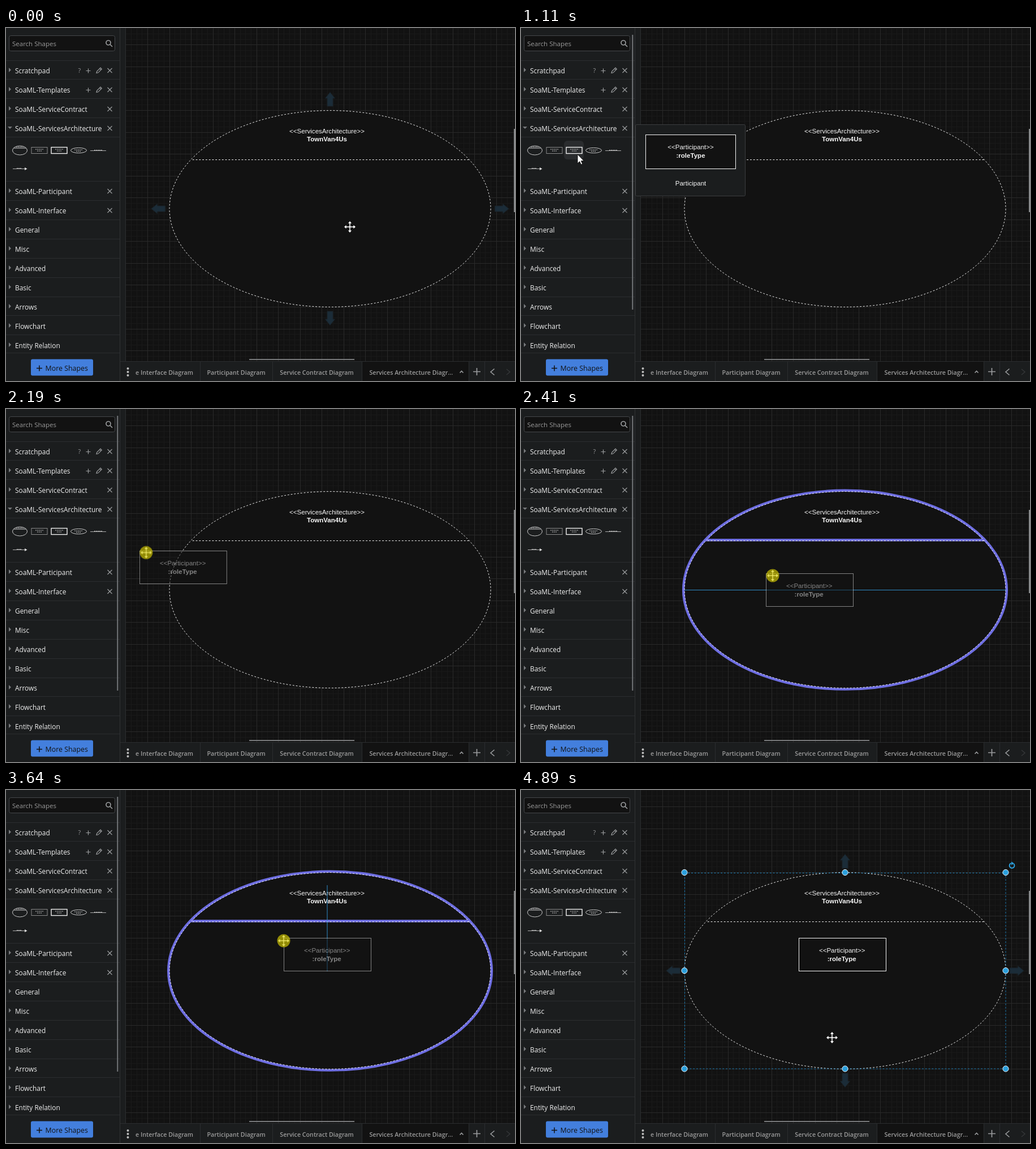
These frames come from a looping animation (900x623 px, 5740 ms). An HTML page:

```html
<!DOCTYPE html>
<html lang="en">
<head>
<meta charset="utf-8">
<title>Diagram editor</title>
<style>
html, body { margin: 0; width: 100%; height: 100%; overflow: hidden; background: #121212; }
svg { display: block; width: 100%; height: 100%; }
text { font-family: "Open Sans", "Noto Sans", sans-serif; fill: #f0f0f0; }
.row { font-size: 11.9px; }
.tab { font-size: 10.7px; font-weight: 600; fill: #9c9c9c; }
.label text { font: 11.56px "Liberation Sans", Arial, sans-serif; fill: #f6f6f6; text-anchor: middle; }
.label .b { font-weight: bold; }
.line { fill: none; stroke: #9a9c9e; }
.sep { fill: none; stroke: #2b2d2f; }
.dash { fill: none; stroke: #f4f4f4; stroke-dasharray: 2.891; }
.pick { fill: none; stroke: #1a7db5; stroke-dasharray: 2.891; }
.glow { fill: none; stroke: #6e6ee2; stroke-width: 4.4; }
.guide { fill: none; stroke: #2f8cc8; }

/* parts that switch on and off */
.k { opacity: 0; animation: 5740ms step-end infinite; }
.arrows { animation-name: arrows; }
.hover { animation-name: hover; }
.tip { animation-name: tip; }
.target { animation-name: target; }
.ghost { animation-name: ghost; }
.gh { animation-name: gh; }
.gv { animation-name: gv; }
.child { animation-name: child; }
.childSel { animation-name: childSel; }
.rootSel { animation-name: rootSel; }
.dot { animation-name: dot; }
.move { animation-name: move; }
.point { animation-name: point; }
.bar { animation-name: bar; }
@keyframes arrows { 0% { opacity: 1 } 6.87% { opacity: 0 } 71.5% { opacity: 1 } 79.61% { opacity: 0 } 83.8% { opacity: 1 } }
@keyframes hover { 13.58% { opacity: 1 } 34.49% { opacity: 0 } }
@keyframes tip { 19.33% { opacity: 1 } 33.27% { opacity: 0 } }
@keyframes target { 39.48% { opacity: 1 } 67.42% { opacity: 0 } }
@keyframes ghost { 36.98% { opacity: 1 } 67.42% { opacity: 0 } }
@keyframes gh { 41.98% { opacity: 1 } 56.68% { opacity: 0 } }
@keyframes gv { 47.21% { opacity: 1 } 67.42% { opacity: 0 } }
@keyframes child { 67.42% { opacity: 1 } 100% { opacity: 1 } }
@keyframes childSel { 67.42% { opacity: 1 } 81% { opacity: 0 } }
@keyframes rootSel { 81% { opacity: 1 } 100% { opacity: 1 } }
@keyframes dot { 33.27% { opacity: 1 } 67.42% { opacity: 0 } 79.61% { opacity: 1 } 82.4% { opacity: 0 } }
@keyframes move { 0% { opacity: 1 } 6.87% { opacity: 0 } 36.98% { opacity: 1 } 100% { opacity: 1 } }
@keyframes point { 6.87% { opacity: 1 } 36.98% { opacity: 0 } }
@keyframes bar {
  9.14% { opacity: 1 }
  79.61% { opacity: 1; animation-timing-function: steps(4, jump-both) }
  85.19%, 100% { opacity: 0 }
}

.cursor { animation: path 5740ms infinite; }
@keyframes path {
  0% { transform: translate(608px, 351px) }
  1.21% { transform: translate(608px, 351px); animation-timing-function: steps(8, jump-both) }
  10.27% { transform: translate(134px, 240px) }
  11.32% { transform: translate(134px, 240px); animation-timing-function: steps(1, jump-both) }
  12.36% { transform: translate(112px, 231px) }
  13.58% { transform: translate(112px, 231px); animation-timing-function: steps(2, jump-both) }
  16.02% { transform: translate(100px, 223px) }
  34.49% { transform: translate(100px, 223px); animation-timing-function: steps(6, jump-both) }
  41.98% { transform: translate(445px, 294px) }
  43.55% { transform: translate(445px, 294px); animation-timing-function: steps(3, jump-both) }
  47.21% { transform: translate(492px, 292px) }
  54% { transform: translate(492px, 292px); animation-timing-function: steps(7, jump-both) }
  63.41% { transform: translate(491px, 266px) }
  68.78% { transform: translate(491px, 266px); animation-timing-function: steps(6, jump-both) }
  77%, 100% { transform: translate(550px, 437px) }
}
.drag { opacity: .5; animation: drag 5740ms infinite; }
@keyframes drag {
  0%, 34.49% { transform: translate(-403px, -41px); animation-timing-function: steps(6, jump-both) }
  41.98% { transform: translate(-58px, 29px) }
  43.55% { transform: translate(-58px, 29px); animation-timing-function: steps(3, jump-both) }
  47.21% { transform: translate(0, 29px) }
  56.68% { transform: translate(0, 29px); animation-timing-function: steps(2, jump-both) }
  63.41%, 100% { transform: translate(0, 0) }
}
</style>
</head>
<body>
<svg viewBox="0 0 900 623">
  <defs>
    <path id="arrow" d="M0-12.5L8.5-2H5V12H-5V-2H-8.5Z" fill="#1b2c38" stroke="#1a2329"/>
    <g id="turn">
      <path d="M3.2-3.2A4.4 4.4 0 1 1-1.5-4.2" fill="none" stroke="#2b9fdc" stroke-width="2"/>
      <path d="M-1-7L4-4L-1-1Z" fill="#2b9fdc"/>
    </g>
    <g id="part" class="label">
      <rect x="491.5" y="261.5" width="154" height="58" fill="#121212" stroke="#f4f4f4"/>
      <text x="567.7" y="287">&lt;&lt;Participant&gt;&gt;</text>
      <text x="567.2" y="301.5" class="b">:roleType</text>
    </g>
    <path id="plus" d="M-4 0H4M0-4V4"/>
    <path id="cross" d="M-4-4L4 4M4-4L-4 4"/>
    <path id="pencil" d="M-4.5 4.5L-3.8 1.5L2.5-4.8L4.8-2.5L-1.5 3.8ZM1-3.3L3.3-1"/>
  </defs>

  <rect width="900" height="623" fill="#121212"/>
  <path id="minor" stroke="#191919"/>
  <path id="major" stroke="#292929"/>

  <!-- diagram -->
  <ellipse cx="573" cy="319" rx="284" ry="173.4" fill="#121212"/>
  <g class="k target">
    <ellipse class="glow" cx="573" cy="319.2" rx="285.8" ry="175.4"/>
    <path class="glow" d="M326 231.3H821"/>
  </g>
  <ellipse class="dash" cx="573" cy="319" rx="284" ry="173.4"/>
  <path class="dash" d="M329.8 232.5H819"/>
  <g class="label">
    <text x="567.5" y="186">&lt;&lt;ServicesArchitecture&gt;&gt;</text>
    <text x="567.5" y="200" class="b">TownVan4Us</text>
  </g>
  <path class="guide k gh" d="M289 319.5H858"/>
  <g class="k gv">
    <path class="guide" d="M568 168V320"/>
    <path class="guide k gh" d="M568 320V349"/>
  </g>
  <g class="k ghost"><g class="drag"><use href="#part"/></g></g>
  <g class="k arrows">
    <use href="#arrow" transform="translate(573 126)"/>
    <use href="#arrow" transform="translate(573 512) rotate(180)"/>
    <use href="#arrow" transform="translate(269.5 319) rotate(-90)"/>
    <use href="#arrow" transform="translate(876.5 319) rotate(90)"/>
  </g>
  <use href="#part" class="k child"/>
  <g class="k childSel">
    <rect x="289.5" y="146.5" width="568" height="346" class="pick" style="stroke:#454545"/>
    <rect x="491.5" y="261.5" width="154" height="58" class="pick"/>
    <g id="childKnobs"></g>
    <use href="#turn" x="656.5" y="249.5"/>
  </g>
  <g class="k rootSel">
    <rect x="289.5" y="146.5" width="567.5" height="345.5" class="pick"/>
    <g id="rootKnobs"></g>
    <use href="#turn" x="868" y="133.5"/>
  </g>

  <!-- canvas edges and tabs -->
  <rect x="898" y="178" width="2" height="147" fill="#8b8d8f"/>
  <rect x="430" y="584" width="186" height="2" fill="#77797b"/>
  <rect x="202" width="9" height="588" fill="#1b1d1e"/>
  <path d="M211.5 0V588" stroke="#2b2d2f"/>
  <rect x="202" y="588" width="698" height="35" fill="#1b1d1e"/>
  <rect x="629" y="588" width="189" height="35" fill="#121212"/>
  <path class="sep" d="M202 588.5H900M343.5 588V623M471.5 588V623M629.5 588V623M818.5 588V623M846.5 588V623"/>
  <g fill="#bdbdbd"><circle cx="215.5" cy="601" r="2"/><circle cx="215.5" cy="607" r="2"/><circle cx="215.5" cy="613" r="2"/></g>
  <text class="tab" x="331" y="611.5" text-anchor="end">e Interface Diagram</text>
  <text class="tab" x="407" y="611.5" text-anchor="middle">Participant Diagram</text>
  <text class="tab" x="549.5" y="611.5" text-anchor="middle">Service Contract Diagram</text>
  <text class="tab" x="716.3" y="611.5" text-anchor="middle">Services Architecture Diagr...</text>
  <path d="M802.5 608.5L805.5 605.5L808.5 608.5" class="line" stroke-width="1.6"/>
  <path d="M826 606.5H839M832.5 600V613" class="line" stroke-width="1.7"/>
  <path d="M863.5 601.5L857 607L863.5 612.5" class="line" stroke-width="1.6"/>
  <path d="M885 602L891 607L885 612" class="line" style="stroke:#353739" stroke-width="1.4"/>

  <!-- sidebar -->
  <rect width="201" height="623" fill="#1b1d1e"/>
  <path d="M201.5 0V623" stroke="#303234"/>
  <rect x="5.5" y="13.5" width="187" height="27" rx="3" fill="#121212" stroke="#45484b"/>
  <text x="11" y="31.5" font-size="11.5" style="fill:#9a9a9a">Search Shapes</text>
  <g class="line" stroke-width="1.7"><circle cx="181" cy="26" r="4"/><path d="M184 29L188 33"/></g>
  <g id="rows"></g>
  <rect class="k hover" x="76" y="199" width="35" height="33" rx="6" fill="#2a2c2e"/>
  <g fill="none" stroke="#c9c9c9">
    <ellipse cx="24.5" cy="216" rx="13" ry="8"/>
    <path d="M13.5 212H35.5"/>
    <rect x="45" y="210.5" width="28" height="11" stroke="#8a8a8a"/>
    <rect x="80" y="210.5" width="28" height="11" stroke="#eee" stroke-width="1.4"/>
    <ellipse cx="128.5" cy="216" rx="14" ry="4.6"/>
    <path d="M149 216.5H177M12 248.5H34" stroke="#aaa"/>
    <path d="M18 210H31M52 214H67M55 217H64M87 214H102M90 217H99M121 215H136M124 217.5H133M156 215.5H170M19 247.5H28" stroke-dasharray="2 1"/>
    <path d="M33 246L37.5 248.5L33 251Z" fill="#ddd" stroke="none"/>
  </g>
  <rect class="k bar" x="196.3" y="12" width="2" height="485" fill="#74777a"/>
  <rect y="574" width="201" height="49" fill="#1b1d1e"/>
  <path class="sep" d="M0 573.5H201"/>
  <rect x="44" y="584.5" width="110" height="29" rx="3" fill="#437fdd"/>
  <path d="M54 600.5H64M59 595.5V605.5" stroke="#121212" stroke-width="1.5"/>
  <text x="69.5" y="604.5" font-size="12.4" style="fill:#121212">More Shapes</text>

  <!-- shape preview -->
  <g class="k tip label">
    <rect x="202.5" y="170.5" width="194" height="126" rx="2" fill="#1b1d1e" stroke="#3b3d3f"/>
    <rect x="220.5" y="188.5" width="159" height="60" fill="#121212" stroke="#f4f4f4"/>
    <text x="300" y="214">&lt;&lt;Participant&gt;&gt;</text>
    <text x="300" y="229" class="b">:roleType</text>
    <text x="300" y="278">Participant</text>
  </g>

  <!-- pointer -->
  <g class="cursor">
    <path class="k move" fill="#fff" stroke="#000" stroke-width=".8"
      d="M0-10.5L4-6H1.2V-1.2H6V-4L10.5 0L6 4V1.2H1.2V6H4L0 10.5L-4 6H-1.2V1.2H-6V4L-10.5 0L-6-4V-1.2H-1.2V-6H-4Z"/>
    <path class="k point" fill="#fff" stroke="#000" stroke-width=".8" d="M0 0V16L3.7 12.6L6.2 18L8.7 17L6.3 11.6H11.2Z"/>
    <circle class="k dot" r="11.5" fill="rgba(215,205,0,.65)"/>
  </g>
</svg>
<script>
const byId = id => document.getElementById(id);

// grid: four small cells to each large one
const CELL = 38.55, LEFT = 211.9, TOP = 29.9;
const lines = { minor: "", major: "" };
for (let i = -4; i < 75; i++) {
  const kind = i % 4 ? "minor" : "major";
  const x = Math.floor(LEFT + i * CELL / 4) + .5;
  const y = Math.floor(TOP + i * CELL / 4) + .5;
  lines[kind] += `M${x} 0V588M212 ${y}H900`;
}
for (const kind in lines) byId(kind).setAttribute("d", lines[kind]);

// selection knobs around a box
function knobs(id, x, y, w, h) {
  let out = "";
  for (const i of [0, .5, 1]) for (const j of [0, .5, 1]) {
    if (i === .5 && j === .5) continue;
    out += `<circle cx="${x + w * i}" cy="${y + h * j}" r="5.1" fill="#2b9fdc" stroke="#e6f3fb"/>`;
  }
  byId(id).innerHTML = out;
}
knobs("childKnobs", 491, 261, 154, 58);
knobs("rootKnobs", 289, 145.5, 568, 346.5);

// palette headings, with their buttons
const ROW = 33.9;
const icon = (name, x, y) => `<use href="#${name}" x="${x}" y="${y}" class="line" stroke-width="1.2"/>`;
function heading(name, top, buttons, open) {
  const y = Math.round(top + 17.8);
  let out = `<path class="sep" d="M0 ${Math.floor(top) + .5}H201"/>
    <path fill="#77797b" d="${open ? `M3 ${y - 3}h8l-4 4z` : `M5 ${y - 5}l4 4l-4 4z`}"/>
    <text class="row" x="16" y="${y + 4.5}">${name}</text>`;
  if (buttons > 2) out += `<text x="127.5" y="${y + 4}" font-size="11" style="fill:#909294">?</text>`;
  if (buttons > 1) out += icon("plus", 145.5, y + .5) + icon("pencil", 164.5, y);
  if (buttons) out += icon("cross", 183.5, y);
  return out;
}
const upper = [["Scratchpad", 3], ["SoaML-Templates", 2], ["SoaML-ServiceContract", 1], ["SoaML-ServicesArchitecture", 1, true]];
const lower = [["SoaML-Participant", 1], ["SoaML-Interface", 1], ...["General", "Misc", "Advanced", "Basic",
  "Arrows", "Flowchart", "Entity Relation"].map(name => [name, 0])];
const stack = (list, top) => list.map(([name, buttons, open], i) => heading(name, top + i * ROW, buttons, open)).join("");
byId("rows").innerHTML = stack(upper, 57) + stack(lower, 270.6) + '<path class="sep" d="M0 192.5H201"/>';
</script>
</body>
</html>
```
